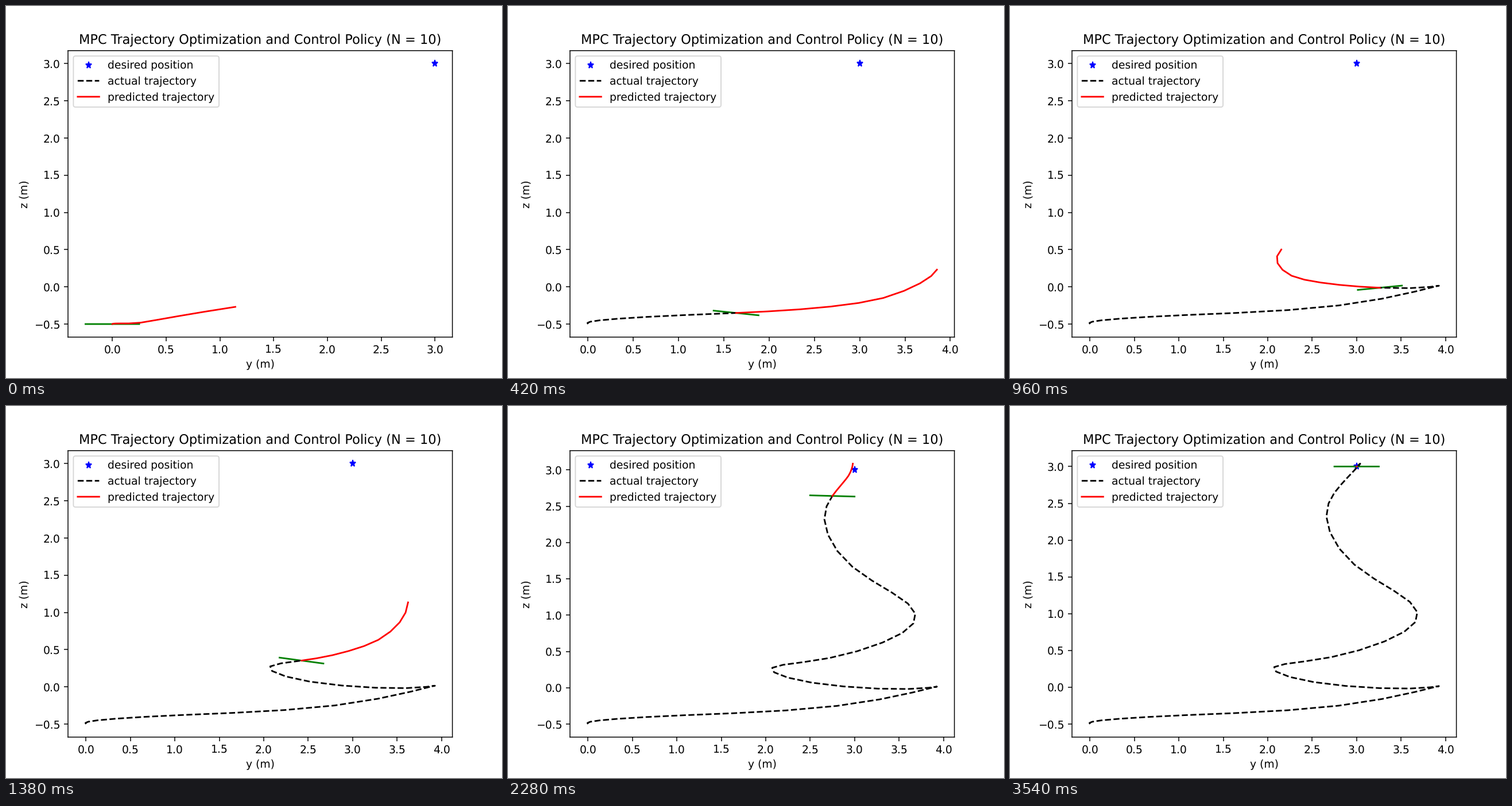
Write a matplotlib script that moves like this. It is 864 px wide and 648 px high and loops after 3.6 s.

```python
import numpy as np
import matplotlib.pyplot as plt
from matplotlib.animation import FuncAnimation

# Soft edges on lines and letters
plt.rcParams.update({"path.snap": False, "text.hinting": "none"})

FRAMES = 60
INTERVAL = 60
GOAL = np.array([3.0, 3.0])
ARM = 0.25          # half length of the vehicle
GRAVITY = 0.39      # per frame squared
HORIZON = 10
STEP = 0.6          # prediction step, in frames
GAP = 3             # frames between key points

# Key points of the flight (y, z)
FLIGHT = np.array([
    (0, -0.5), (0.127, -0.45), (1.09, -0.378), (2.80, -0.25), (3.87, 0),
    (3.60, -0.017), (2.52, 0.07), (2.073, 0.275), (2.717, 0.41),
    (3.537, 0.755), (3.60, 1.16), (2.975, 1.667), (2.66, 2.32),
    (2.828, 2.758), (2.99, 2.968), (3.041, 3.039)])


def settle(start, count=7):
    """Critically damped approach to the goal."""
    n = 0.5 * GAP * np.arange(1, count + 1)[:, None]
    return GOAL + (start - GOAL) * (1 + n) * np.exp(-n)


def spline_bend(points):
    """Second derivatives of the natural cubic spline through the points."""
    n = len(points)
    system = 4 * np.eye(n) + np.eye(n, k=1) + np.eye(n, k=-1)
    system[[0, -1]] = np.eye(n)[[0, -1]]
    rhs = np.zeros_like(points)
    rhs[1:-1] = 6 * np.diff(points, 2, axis=0) / GAP ** 2
    return np.linalg.solve(system, rhs)


KEYS = np.vstack([FLIGHT, settle(FLIGHT[-1])])
BEND = spline_bend(KEYS)


def locate(t):
    """Key index and the weights of this key and the next one."""
    s = np.atleast_1d(t) / GAP
    i = np.clip(s.astype(int), 0, len(KEYS) - 2)
    u = (s - i)[:, None]
    return i, 1 - u, u


def position(t):
    i, w, u = locate(t)
    curve = (w ** 3 - w) * BEND[i] + (u ** 3 - u) * BEND[i + 1]
    return w * KEYS[i] + u * KEYS[i + 1] + curve * GAP ** 2 / 6


def acceleration(t):
    i, w, u = locate(t)
    return w * BEND[i] + u * BEND[i + 1]


def predict(k):
    """The coming path, drifting off toward the end of the horizon."""
    j = np.arange(HORIZON)
    s = j / (HORIZON - 1)
    path = position(k + STEP * j)
    error = GOAL - path[0]
    first_plan = np.exp(-k) * s ** 1.5
    path[:, 0] += 0.39 * first_plan - 0.06 * np.tanh(4 * error[0]) * s ** 1.5
    path[:, 1] -= 0.1 * first_plan
    path[:, 1] += 0.12 * np.sqrt(max(error[1], 0)) * np.clip(2 * s - 1, 0, 1) ** 1.4
    return path


fig, ax = plt.subplots(figsize=(6.4, 4.8), dpi=135)


def draw(k):
    ax.clear()
    flown = position(np.arange(k + 1))
    tilt = -np.arctan(acceleration(k)[0, 0] / GRAVITY)
    arm = ARM * np.array([np.cos(tilt), np.sin(tilt)])
    body = np.array([flown[-1] - arm, flown[-1] + arm])

    ax.plot(*GOAL, "b*", label="desired position")
    ax.plot(*body.T, "g")
    ax.plot(*flown.T, "k--", label="actual trajectory")
    ax.plot(*predict(k).T, "r", label="predicted trajectory")
    ax.set_title("MPC Trajectory Optimization and Control Policy (N = 10)")
    ax.set_xlabel("y (m)")
    ax.set_ylabel("z (m)")
    ax.legend(loc="upper left")


anim = FuncAnimation(fig, draw, frames=FRAMES, interval=INTERVAL,
                     init_func=lambda: None, repeat=True, repeat_delay=0)
plt.show()
```
